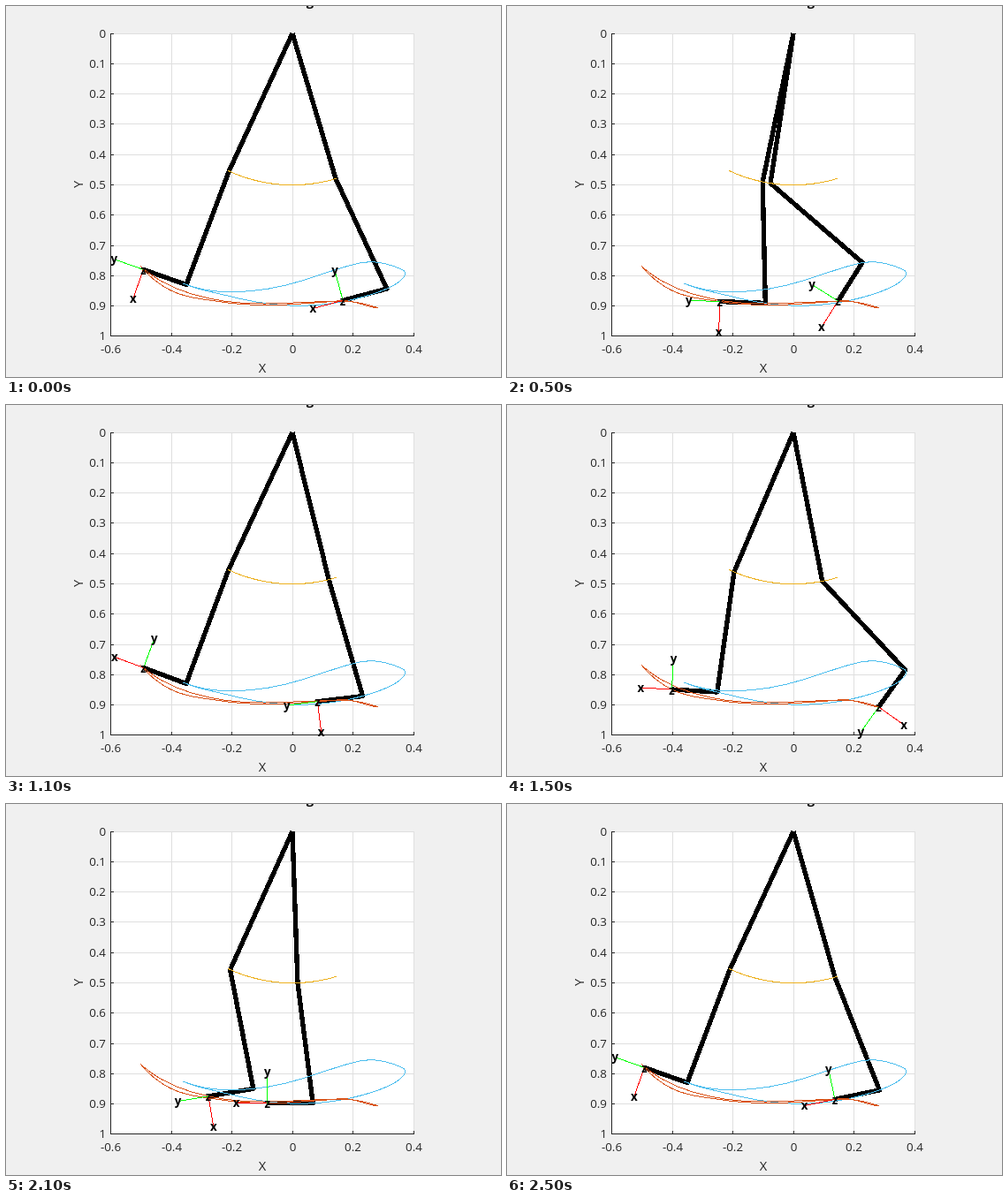
Animation, 560 px wide and 420 px high, one loop 2.55 s. Source, as an HTML page:

```html
<!DOCTYPE html>
<html lang="en">
<head>
<meta charset="utf-8">
<title>Walking legs</title>
<style>
html, body { margin: 0; width: 100%; height: 100%; overflow: hidden; background: #f0f0f0; }
svg { display: block; font: 13.33px "Open Sans", "Noto Sans", sans-serif; fill: #262626; }
polyline { fill: none; stroke-linejoin: round; shape-rendering: crispEdges; }
.big { font-size: 14.67px; }
.bold { font-weight: bold; fill: #000; }
</style>
</head>
<body>
<svg width="560" height="420" viewBox="0 0 560 420">
  <g id="axes"></g>
  <g id="legs"></g>
  <g id="traces"></g>
  <g id="triads"></g>
</svg>
<script>
const FRAMES = 51, STEP = 50, PERIOD = 50;
const UNIT = 343.3, HIP = [324, 31];

// Gait keys: phase, thigh, shank (from vertical), foot (from horizontal), in degrees
const KEYS = [
  [0, 24.7, 20.6, 19.4], [4, 23, 8, 3.3], [10, 11.7, -1.3, 2], [16, -2, -7.2, 0.3],
  [22, -13.9, -16.2, -7], [24, -15.9, -21.5, -11.8], [25, -16.6, -24.9, -15],
  [30, -11, -43, -54.5], [35, 8.7, -49.2, -57.8], [37, 14.9, -42, -45.3],
  [42, 24.2, -11, -9.5], [47, 24.9, 20.4, 20.4], [48.5, 24.9, 22.2, 22.6]
];

function key(i) {
  const n = KEYS.length, k = KEYS[(i + n) % n];
  return [k[0] + PERIOD * Math.floor(i / n), ...k.slice(1)];
}

// Periodic cubic through the keys
function angles(u) {
  u %= PERIOD;
  let i = KEYS.length - 1;
  while (KEYS[i][0] > u) i--;
  const [a, b, c, d] = [i - 1, i, i + 1, i + 2].map(key);
  const h = c[0] - b[0], s = (u - b[0]) / h;
  const tangent = (p, q, r, j) => {
    const h1 = q[0] - p[0], h2 = r[0] - q[0];
    return ((q[j] - p[j]) / h1 * h2 + (r[j] - q[j]) / h2 * h1) / (h1 + h2);
  };
  return [1, 2, 3].map(j => {
    const m0 = tangent(a, b, c, j) * h, m1 = tangent(b, c, d, j) * h, rise = c[j] - b[j];
    const v = b[j] + s * (m0 + s * (3 * rise - 2 * m0 - m1 + s * (m0 + m1 - 2 * rise)));
    return v * Math.PI / 180;
  });
}

function pose(u) {
  const [thigh, shank, foot] = angles(u);
  const hang = ([x, y], a, len) => [x - Math.sin(a) * len * UNIT, y + Math.cos(a) * len * UNIT];
  const knee = hang(HIP, thigh, 0.5);
  const ankle = hang(knee, shank, 0.4);
  const toe = hang(ankle, foot + Math.PI / 2, 0.15);
  return { knee, ankle, toe, foot };
}

const cycle = Array.from({ length: FRAMES }, (_, u) => pose(u));

const line = (points, color, width = 1) =>
  `<polyline points="${points.join(' ')}" stroke="${color}" stroke-width="${width}"/>`;

const text = (str, x, y, style = '', anchor = 'middle', extra = '') =>
  `<text x="${x}" y="${y}" class="${style}" text-anchor="${anchor}" ${extra}>${str}</text>`;

const fill = (id, markup) => { document.getElementById(id).innerHTML = markup; };

function axes() {
  const xs = [-0.6, -0.4, -0.2, 0, 0.2, 0.4].map(v => [v, Math.floor(324.3 + v * 343) + 0.5]);
  const ys = Array.from({ length: 11 }, (_, i) => [i / 10, Math.floor(31 + i * 34.29) + 0.5]);
  return '<rect x="118" y="31" width="343.5" height="343" fill="#fff"/>' +
    xs.map(([, x]) => line([[x, 31], [x, 374]], '#dfdfdf')).join('') +
    ys.map(([, y]) => line([[118, y], [462, y]], '#dfdfdf')).join('') +
    line([[118.5, 31], [118.5, 373.5], [462, 373.5]], '#262626') +
    xs.map(([v, x]) => line([[x, 374], [x, 370]], '#262626') + text(v, x, 393)).join('') +
    ys.map(([v, y]) => line([[118, y], [122, y]], '#262626') + text(v, 113, y + 4.5, '', 'end')).join('') +
    text('X', 290, 415, 'big') +
    text('Y', 87, 202, 'big', 'middle', 'transform="rotate(-90 87 202)"') +
    text('g', 344, 0.3, 'big bold');
}

const leg = ({ knee, ankle, toe }) => line([HIP, knee, ankle, toe], '#000', 5.33);

// Foot frame: one axis points along the foot, the other is perpendicular
function triad({ toe, foot }, xTurn) {
  const axis = (name, a, color) => {
    const at = r => [toe[0] - Math.cos(a) * r, toe[1] - Math.sin(a) * r];
    const [x, y] = at(35);
    return line([toe, at(34)], color) + text(name, x, y + 4.5, 'bold');
  };
  return axis('x', foot + xTurn, '#f00') +
    axis('y', foot + xTurn + Math.PI / 2, '#0f0') +
    text('z', toe[0], toe[1] + 5.5, 'bold');
}

let shown = -1;
function draw(time) {
  const f = Math.floor(time / STEP) % FRAMES;
  if (f === shown) return;
  shown = f;
  const left = cycle[f], right = cycle[(f + 25) % FRAMES];
  fill('legs', leg(left) + leg(right));
  fill('triads', triad(left, -Math.PI / 2) + triad(right, 0));
}

fill('axes', axes());
fill('traces', line(cycle.map(p => p.knee), '#edb120') +
  line(cycle.map(p => p.ankle), '#4dbeee') +
  line(cycle.map(p => p.toe), '#d95319'));

let start;
function tick(now) {
  start ??= now;
  draw(now - start);
  requestAnimationFrame(tick);
}
draw(0);
requestAnimationFrame(tick);
</script>
</body>
</html>
```
